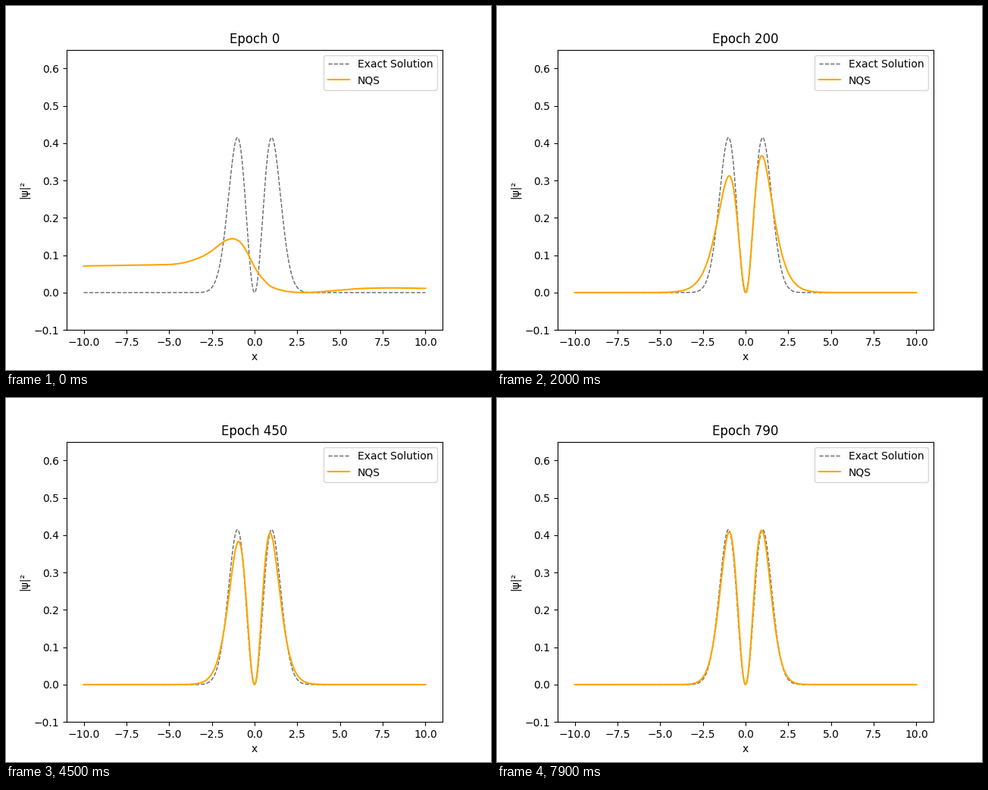
A matplotlib script for the animation above (8000 ms loop, 640 px wide and 480 px high).

```python
import numpy as np
import matplotlib.pyplot as plt
from matplotlib.animation import FuncAnimation

FRAMES, INTERVAL = 80, 100
SETTLED = 14  # step at which the two-lobe shape has formed

x = np.linspace(-10, 10, 1000)
dx = x[1] - x[0]


def smooth(xk, yk, xs):
    """Monotone cubic interpolation through the points (xk, yk)."""
    xk, yk = np.asarray(xk, float), np.asarray(yk, float)
    h, d = np.diff(xk), np.diff(yk) / np.diff(xk)
    same = d[:-1] * d[1:] > 0
    total = np.where(same, d[:-1] + d[1:], 1)
    inner = np.where(same, 2 * d[:-1] * d[1:] / total, 0)
    m = np.concatenate([d[:1], inner, d[-1:]])
    i = np.clip(np.searchsorted(xk, xs, side="right") - 1, 0, len(h) - 1)
    t = (xs - xk[i]) / h[i]
    return ((1 + 2 * t) * (1 - t) ** 2 * yk[i] + t * (1 - t) ** 2 * h[i] * m[i]
            + t * t * (3 - 2 * t) * yk[i + 1] + t * t * (t - 1) * h[i] * m[i + 1])


def lobe(r, w):
    """Lobe with its peak of 1 at r = 1; small w gives a longer tail."""
    q = np.sqrt(1 + w * w)
    return r * np.exp(-q * (np.sqrt(w * w + r * r) - q))


# Untrained wave function, given as signed density
start_x = [-10, -7.5, -5, -4.25, -3.5, -3, -2.5, -2, -1.65, -1.3, -0.95, -0.6,
           -0.25, 0, 0.5, 1, 1.75, 2.9, 4, 5, 6.5, 8, 10]
start_p = np.array([.0712, .0732, .0751, .079, .0885, .098, .112, .130, .140,
                    .1443, .139, .121, .091, .068, .036, .0155, .0045, 0,
                    -.0028, -.0068, -.0113, -.0125, -.0112])
psi_start = smooth(start_x, np.sign(start_p) * np.sqrt(np.abs(start_p)), x)
area_start = np.sum(psi_start ** 2) * dx

# Lobe heights, distances from the node, and the node itself over time
steps = [14, 27, 45, 57, 69, 79]
left_p = [.242, .368, .383, .388, .406, .409]
right_p = [.305, .411, .405, .393, .410, .413]
left_m = [1.10, .89, .935, .95, .945, .95]
right_m = [1.03, .855, .91, .935, .93, .94]
node_x = [.05, 0, 0, 0, 0, 0]

# Lobe area as a function of w, used to keep the total probability at 1
widths = np.geomspace(0.05, 20, 200)
r = np.linspace(0, 15, 3000)
areas = np.array([np.sum(lobe(r, w) ** 2) * r[1] for w in widths])


def two_lobes(n):
    pl, pr, ml, mr, c = (smooth(steps, k, n) for k in
                         (left_p, right_p, left_m, right_m, node_x))
    w = np.interp(1 / (pl * ml + pr * mr), areas[::-1], widths[::-1])
    u = x - c
    return np.where(u < 0, np.sqrt(pl) * lobe(np.abs(u) / ml, w),
                    -np.sqrt(pr) * lobe(np.abs(u) / mr, w))


def density(n):
    if n >= SETTLED:
        return two_lobes(n) ** 2
    t = n / SETTLED
    s = t * t * (3 - 2 * t)
    psi = (1 - s) * psi_start * np.exp(-0.004 * n * x ** 2) + s * two_lobes(SETTLED)
    area = np.sum(psi ** 2) * dx
    return psi ** 2 * ((1 - s) * area_start + s) / area


fig, ax = plt.subplots(figsize=(6.4, 4.8), dpi=100)
exact = 2 / np.sqrt(np.pi) * x ** 2 * np.exp(-x ** 2)
ax.plot(x, exact, "--", color="black", alpha=0.6, lw=1, label="Exact Solution")
line, = ax.plot(x, density(0), color="orange", lw=1.5, label="NQS")
ax.set_ylim(-0.1, 0.65)
ax.set_xlabel("x")
ax.set_ylabel("|ψ|²")
ax.legend(loc="upper right")
title = ax.set_title("Epoch 0")


def update(n):
    line.set_ydata(density(n))
    title.set_text(f"Epoch {10 * n}")
    return line, title


anim = FuncAnimation(fig, update, frames=FRAMES, interval=INTERVAL,
                     repeat=True, repeat_delay=0)
plt.show()
```
